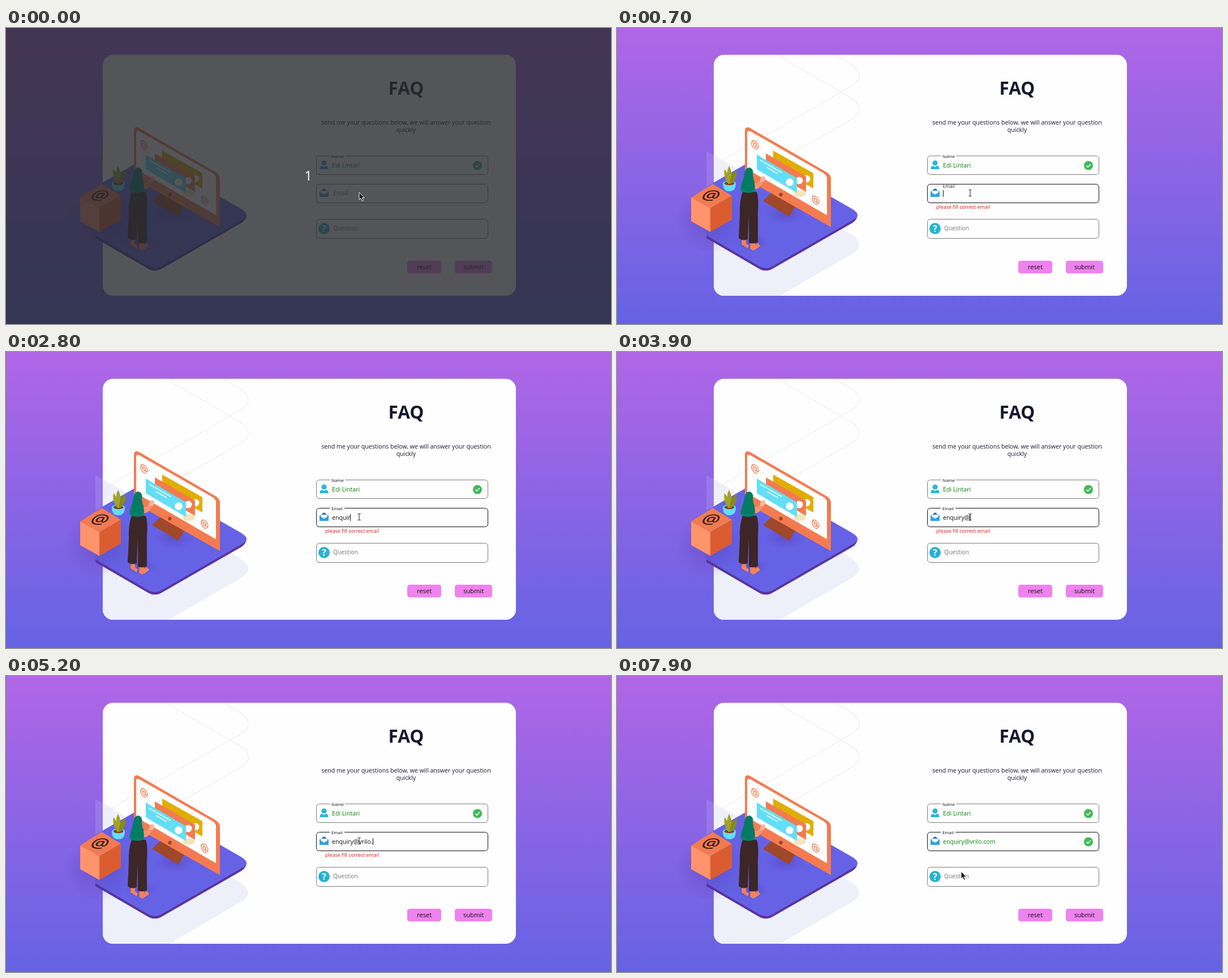
An HTML page that plays this animation: 1069 by 524 pixels, repeating every 8 s.

```html
<!DOCTYPE html>
<html lang="en">
<head>
<meta charset="utf-8">
<title>FAQ form</title>
<style>
html, body { margin: 0; width: 100%; height: 100%; overflow: hidden; background: #6563e3; }
svg { display: block; width: 100%; height: 100%; font: 500 10.6px "Open Sans", sans-serif; fill: #17172e; }
.mid { text-anchor: middle; }
.field { fill: #fefefe; stroke: #7c7c7c; }
.hint { fill: #757575; font-size: 10.3px; }
.label { fill: #111; font-size: 7.8px; }
.ok { fill: #0a800a; }
.button { fill: #ee82ee; }
.button + text { font-size: 11.2px; fill: #111; }
.at { font-weight: 600; text-anchor: middle; fill: #f47b50; }
</style>
</head>
<body>
<svg viewBox="0 0 1069 524" preserveAspectRatio="none">
  <defs>
    <linearGradient id="sky" x2="0" y2="1">
      <stop stop-color="#b066e6"/><stop offset="1" stop-color="#6563e3"/>
    </linearGradient>
    <radialGradient id="shade">
      <stop stop-color="#4b2d9c" stop-opacity=".32"/><stop offset="1" stop-color="#4b2d9c" stop-opacity="0"/>
    </radialGradient>
    <clipPath id="inside"><rect x="171" y="47.500" width="730" height="426.500" rx="18"/></clipPath>
    <g id="tick">
      <circle r="8" fill="#3fba55"/>
      <path d="M-3.6 .2 L-1 2.8 L3.8 -2.4" fill="none" stroke="#fff" stroke-width="1.8"/>
    </g>
  </defs>

  <rect width="1069" height="524" fill="url(#sky)"/>
  <rect x="171" y="47.500" width="730" height="426.500" rx="18" fill="#fefefe"/>

  <g id="backdrop">
    <path d="M158 218 L171 225.500 V300 H158Z" fill="#edf0f9" opacity=".12"/>
    <g clip-path="url(#inside)">
      <path d="M171 225 L405 360 Q428 373 428 383 Q428 392 415 400 L288 474 H171Z" fill="#edf0f9"/>
      <g fill="none" stroke="#ececec" stroke-width="1.2">
        <path d="M385 48 L414 65 Q428 74 428 85 Q428 95 414 103 L171 243"/>
        <path d="M283 48 L414 124 Q428 133 428 145 Q428 154 414 162 L240 262"/>
      </g>
    </g>
  </g>

  <g id="platform">
    <path d="M158 367 V372 L249 425 Q263 434 277 425 L416 345 Q425 339 425 330Z" fill="#5a349f"/>
    <path d="M158 281 L250 228 L262 232 L415 320 Q425 326 425 331 Q425 336 415 341 L276 421 Q263 429 250 421 L158 367Z" fill="#6662e6"/>
    <ellipse cx="165" cy="341" rx="62" ry="58" fill="url(#shade)"/>
    <ellipse cx="297" cy="329" rx="36" ry="20" fill="url(#shade)"/>
    <ellipse cx="238" cy="379" rx="30" ry="16" fill="url(#shade)"/>
  </g>

  <g id="monitor">
    <path d="M273 292 L258 306 L304 334 L316 315Z" fill="#a0482a"/>
    <path d="M226 183 Q226 173 235 177 L370 255 Q378 260 378 267 V352.500 L226 266Z" fill="#f47b50"/>
    <path d="M230 187 Q230 180 236 183 L365 257 Q371 261 371 266 V331.500 L230 250Z" fill="#fefefe"/>
    <circle cx="289.5" cy="295" r="3.2" fill="#9c482b"/>
    <ellipse cx="323" cy="293" rx="11" ry="6" fill="#f4e5ba"/>
    <path d="M276 217 L347 257 V284 L276 244Z" fill="#e0ad00"/>
    <circle cx="335" cy="267" r="6.5" fill="#fff"/>
    <path d="M263 222 L334 263 V290 L263 249Z" fill="#f47b50"/>
    <circle cx="322" cy="270" r="6.5" fill="#fff"/>
    <path d="M247 224 L318 266 V292 L247 250Z" fill="#62def7"/>
    <circle cx="305" cy="273" r="6.8" fill="#fff"/>
    <path d="M253 234 L291 256 M265 247 L284 258" stroke="#fff" stroke-width="1.6"/>
    <text class="at" font-size="19" transform="matrix(.87 .5 0 1 244 213)">@</text>
    <text class="at" font-size="19" transform="matrix(.87 .5 0 1 351 311)">@</text>
  </g>

  <g id="cube">
    <path d="M169 276 L203 297 L165 319 L131 300Z" fill="#f27b51"/>
    <path d="M131 300 L165 319 V361 L131 342Z" fill="#ff936c"/>
    <path d="M203 297 L165 319 V361 L203 339Z" fill="#dc5c31"/>
    <text class="at" font-size="34" style="fill:#33201f" transform="matrix(1 .08 -.4 .68 162 304)">@</text>
  </g>

  <g id="plant">
    <path d="M187 275 Q187 289 198.500 289 Q210 289 210 275Z" fill="#62def7"/>
    <ellipse cx="198.500" cy="275" rx="11.500" ry="4.500" fill="#62def7"/>
    <ellipse cx="198.500" cy="275" rx="9" ry="3.200" fill="#8c3f20"/>
    <path d="M197 276 Q187 264 190 250 Q199 260 199 276Z M198 276 Q191 257 198 244 Q206 258 200 276Z" fill="#a2a422"/>
    <path d="M199 276 Q200 257 212 252 Q212 270 201 276Z" fill="#858b18"/>
  </g>

  <g id="woman">
    <path d="M221 372 L220 383 L231 390 L233 385 L228 381 V372Z M236 378 L235 390 Q239 395 243 393 L253 386 L250 381 L244 383 L243 378Z" fill="#f0835a"/>
    <path d="M222 290 H247 Q251 302 249 325 L249 379 Q241 383 233 380 L233 330 L231 374 Q222 378 215 372 L217 330 Q216 306 222 290Z" fill="#3d2626"/>
    <path d="M237 267 L246 275 L252 271 L254 264 Q259 261 262 265 L260 272 L251 283 Q244 288 238 282Z" fill="#f9936d"/>
    <path d="M252 272 L255 264 Q259 260 262 265 L260 272Z" fill="#f7b7a2"/>
    <path d="M225 266 Q219 272 218 288 Q232 295 244 289 L243 271 L237 266Z" fill="#04866b"/>
    <path d="M226 254 Q228 247 234 247 Q242 249 240 260 L244 282 Q239 291 230 289 L219 284 Q222 278 223 268Z" fill="#047b64"/>
  </g>

  <text class="mid" x="707" y="118" font-size="31.5" font-weight="700">FAQ</text>
  <g class="mid">
    <text x="707" y="171">send me your questions below, we will answer your question</text>
    <text x="707" y="184">quickly</text>
  </g>

  <rect class="field" x="548.5" y="226.5" width="303" height="33" rx="5"/>
  <rect class="field" id="emailField" x="548.5" y="276.5" width="303" height="33" rx="5"/>
  <rect class="field" x="548.5" y="338.5" width="303" height="34" rx="5"/>

  <g fill="#29b6d8">
    <circle cx="562" cy="239" r="4.6"/>
    <path d="M554.500 250 Q554 244 559 244 L562 246 L565 244 Q570 244 569.500 250Z"/>
  </g>
  <path d="M554 290 L562 284 L570 290 V299 H554Z" fill="#1674b8"/>
  <path d="M556 288 H568 V295 H556Z" fill="#fff"/>
  <path d="M554 290 L562 295 L570 290 V299 H554Z" fill="#2ea3dc"/>
  <circle cx="562" cy="355" r="10" fill="#27b3d1"/>
  <text class="mid" x="562" y="361" font-size="16" font-weight="700" style="fill:#fff">?</text>

  <rect x="572" y="224" width="27" height="6" fill="#fefefe"/>
  <text class="label" x="575" y="230">Name</text>
  <text class="ok" x="576" y="247">Edi Lintari</text>
  <use href="#tick" x="833" y="243.5"/>

  <rect id="gap" width="26" height="7" fill="#fefefe"/>
  <text id="emailLabel">Email</text>
  <text id="email" x="576" y="297"></text>
  <path id="caret" d="M.5 287 V299" stroke="#111"/>
  <use id="valid" href="#tick" x="833" y="293.5"/>
  <text id="error" x="564" y="319.500" font-size="8.9" fill="#e3170f">please fill correct email</text>
  <text class="hint" x="578" y="358">Question</text>

  <rect class="button" x="709" y="412" width="60" height="22.5" rx="4.5"/>
  <text class="mid" x="739" y="427">reset</text>
  <rect class="button" x="793" y="412" width="66" height="22.5" rx="4.5"/>
  <text class="mid" x="826" y="427">submit</text>

  <g id="countdown">
    <rect width="1069" height="524" fill="#282b30" opacity=".8"/>
    <text class="mid" x="534" y="270" font-size="24" font-weight="400" style="fill:#fff">1</text>
  </g>
  <path id="beam" d="M-2.500 -5.500 H-.5 L0 -5 L.5 -5.500 H2.500 M0 -5 V5 M-2.500 5.500 H-.5 L0 5 L.5 5.500 H2.500" fill="none" stroke="#222"/>
  <path id="arrow" d="M0 0 V13 L3 10.300 L5.200 15.300 L7.500 14.300 L5.300 9.500 H9.300Z" fill="#1c1c1c" stroke="#fff" stroke-width=".9"/>
</svg>
<script>
const LOOP = 8000, TICK = 100;
const address = 'enquiry@vrilo.com';
const keyTimes = [1700, 1900, 2000, 2200, 2500, 2800, 3000, 3900, 4300,
  4500, 4600, 4700, 5000, 5200, 5300, 5500, 5900];
const blinks = [[1000, 1600], [3500, 3900], [6500, 7100], [7800, LOOP]];
// Pointer stops: time, shape, x, y
const stops = [[0, 'arrow', 624, 291], [100, 'beam', 624, 292], [7500, 'beam', 635, 296],
  [7600, 'arrow', 611, 327], [7800, 'arrow', 605, 344], [7900, 'arrow', 608, 346]];

const el = id => document.getElementById(id);
const show = (id, on) => el(id).style.display = on ? '' : 'none';
const within = (t, [from, to]) => t >= from && t < to;
const mix = (a, b, p) => a + (b - a) * p;
const ease = p => p * p * (3 - 2 * p);

function drawLabel(t) {
  const p = ease(Math.min(1, Math.max(0, (t - 420) / 400)));
  const x = mix(578, 575, p), y = mix(296, 280, p);
  const shade = mix(117, 17, p);
  const label = el('emailLabel');
  label.setAttribute('x', x);
  label.setAttribute('y', y);
  label.style.fontSize = mix(10.3, 7.8, p) + 'px';
  label.style.fill = `rgb(${shade}, ${shade}, ${shade})`;
  el('gap').setAttribute('x', x - 3);
  el('gap').setAttribute('y', y - 6);
}

function drawEmail(t) {
  const focused = t >= 500;
  const valid = t >= 4300 && !within(t, [5200, 5300]);
  const text = el('email');
  text.textContent = address.slice(0, keyTimes.filter(k => k <= t).length);
  text.style.fill = valid ? '#0a800a' : '#111';
  el('emailField').style.stroke = focused ? '#111' : '';
  show('valid', valid);
  show('error', focused && !valid);
  show('caret', focused && !blinks.some(span => within(t, span)));
  const end = text.textContent ? text.getComputedTextLength() : 0;
  el('caret').setAttribute('transform', `translate(${Math.round(576 + end)})`);
}

function drawPointer(t) {
  const [, shape, x, y] = stops.filter(s => s[0] <= t).pop();
  show('beam', shape === 'beam');
  show('arrow', shape === 'arrow');
  el(shape).setAttribute('transform', `translate(${x} ${y})`);
}

const start = performance.now();
function frame() {
  const t = Math.floor((performance.now() - start) % LOOP / TICK) * TICK;
  show('countdown', t < 100);
  show('backdrop', t >= 100);
  drawLabel(t);
  drawEmail(t);
  drawPointer(t);
  requestAnimationFrame(frame);
}
frame();
</script>
</body>
</html>
```
